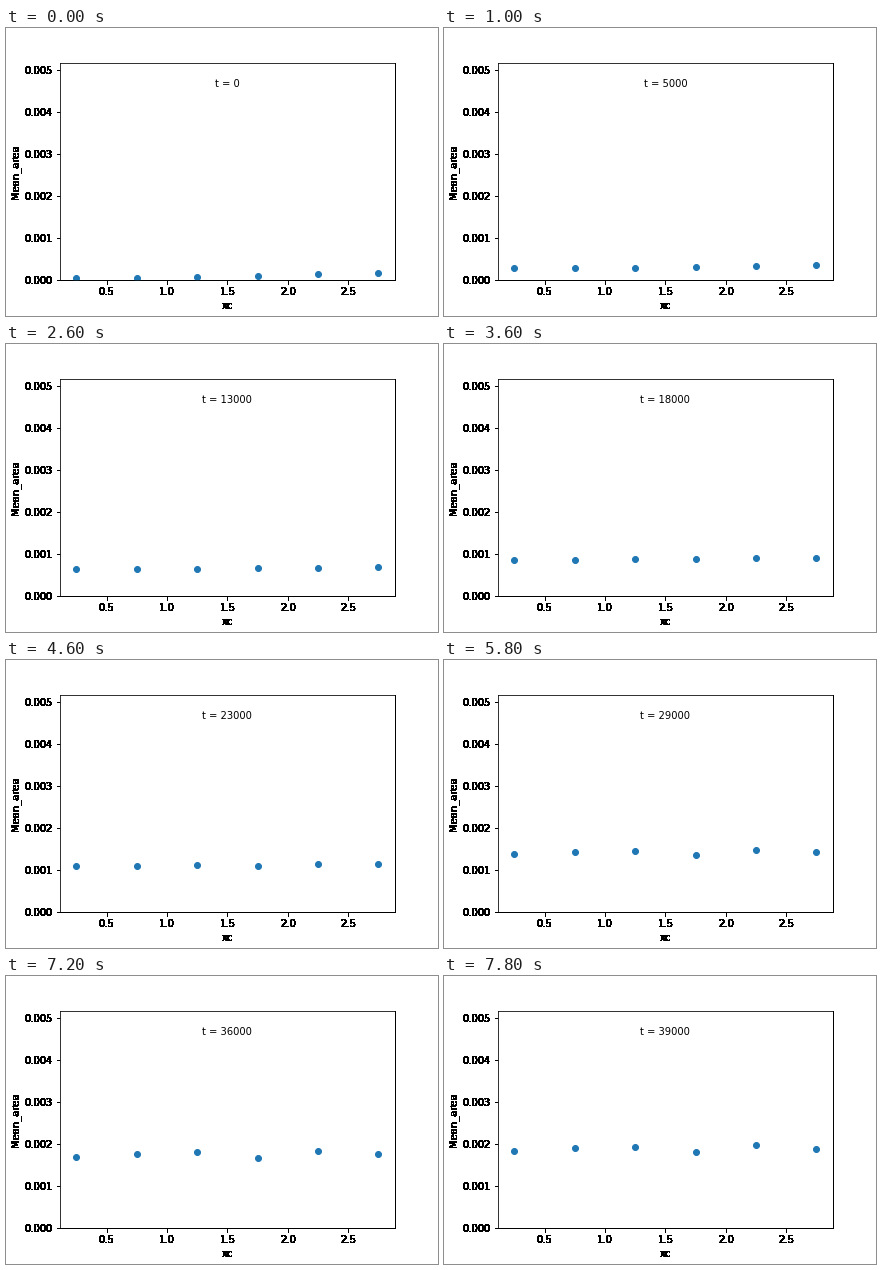
A matplotlib script that plays this animation: 432 by 288 pixels, repeating every 8 s.

```python
import numpy as np
import matplotlib.pyplot as plt
from matplotlib.animation import FuncAnimation

STEPS = 40
INTERVAL = 200
OVERDRAWS = 120  # repeated drawing thickens the labels

XC = np.arange(0.25, 3, 0.5)
EARLY = 11.7 * np.linspace(0, 1, 6) ** 1.6  # initial tilt, fades out
LATE = np.array([3, 9.5, 13, -1, 16, 7])    # spread that builds up later

plt.rcParams["font.family"] = "DejaVu Sans"
plt.rcParams["font.size"] = 10

fig = plt.figure(figsize=(6, 4), dpi=72, facecolor="white")
ax = fig.add_axes([0.125, 0.125, 0.775, 0.755])
ax.set_xlim(0.1135, 2.8865)
ax.set_ylim(0, 0.005177)
ax.set_xticks(np.arange(0.5, 3, 0.5))
ax.set_yticks(np.arange(6) * 0.001)
ax.set_xlabel("xc")
ax.set_ylabel("Mean_area")


def thicken_labels():
    """Draw the empty axes many times on one canvas and keep it as backdrop."""
    fig.canvas.draw()
    renderer = fig.canvas.get_renderer()
    for _ in range(OVERDRAWS):
        ax.draw(renderer)
    fig.figimage(np.array(renderer.buffer_rgba()), origin="upper", zorder=-1)


def smoothstep(x):
    x = np.clip(x, 0, 1)
    return x * x * (3 - 2 * x)


def areas(step):
    growth = 5 + 4.5 * step
    tilt = EARLY * np.exp(-step / 20)
    spread = LATE * smoothstep((step - 19) / 17)
    return (growth + tilt + spread) * 1e-5


thicken_labels()
dots = ax.scatter(XC, areas(0), color="C0")
clock = ax.text(0.5, 0.8876, "", transform=ax.transAxes, ha="center")


def update(step):
    dots.set_offsets(np.column_stack([XC, areas(step)]))
    clock.set_text(f"t = {step * 1000}")
    return dots, clock


anim = FuncAnimation(fig, update, frames=STEPS, init_func=lambda: update(0),
                     interval=INTERVAL, repeat=True, repeat_delay=0, blit=False)

plt.show()
```
